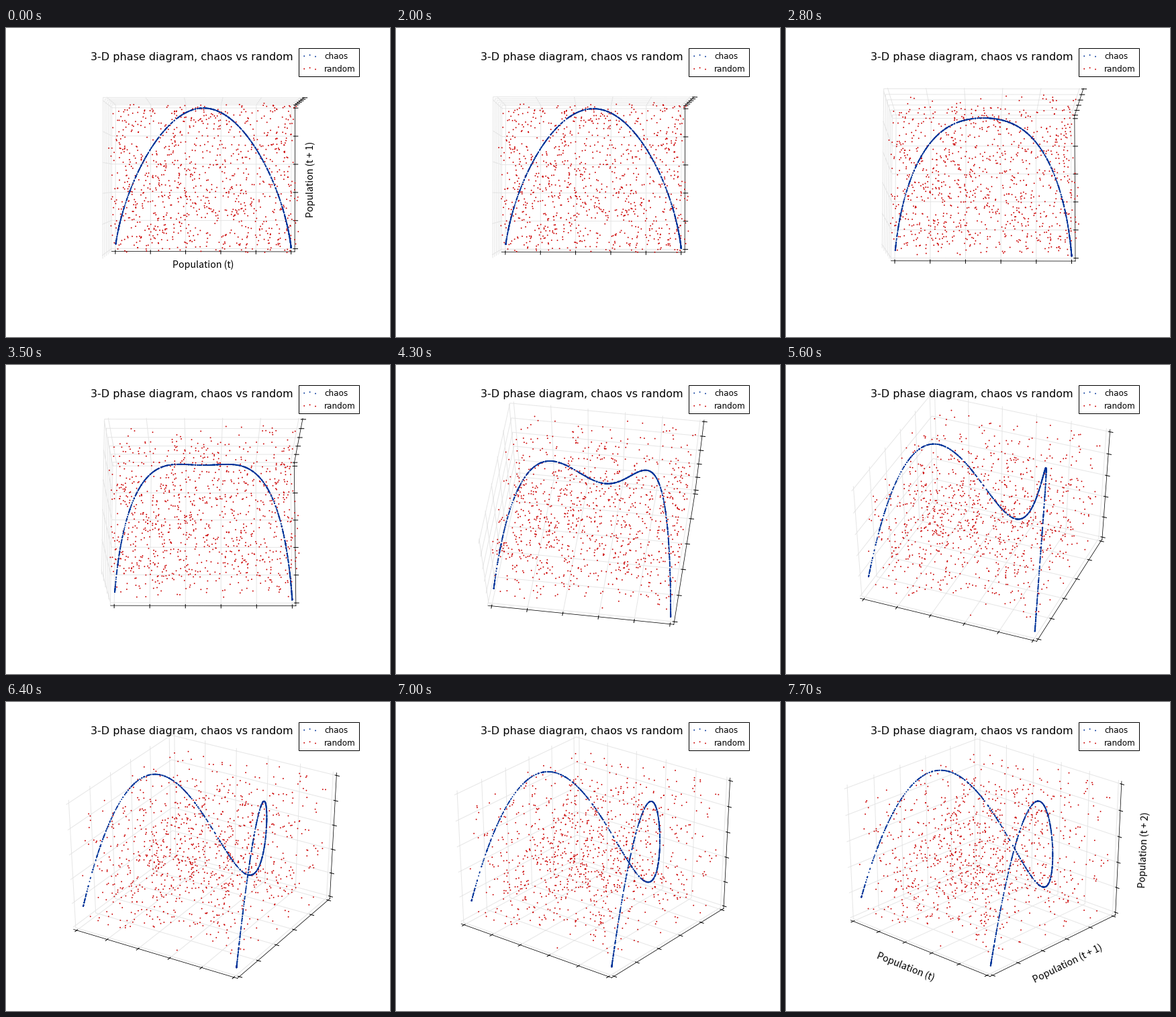
Animation of 572x460 px, one loop 10000 ms. Source, as a matplotlib script:

```python
import numpy as np
import matplotlib.pyplot as plt
from matplotlib.animation import FuncAnimation
from matplotlib.patches import Rectangle

W, H, DPI = 572, 460, 72          # at 72 dpi one point is one pixel
CENTER = np.array([294.0, 223.5])
SCALE = np.array([3016.0, -2413.0])
DIST = 11.0
BLUE, RED, GRID = "#003399", "#cc0000", "#e6e6e6"
DOT = 1.9
TICKS = np.linspace(0, 1, 6)
LO, HI = -1 / 48, 1 + 1 / 48      # panes sit slightly outside the data cube
OUT, IN = 0.2 / 12, 0.1 / 12      # tick lengths on each side of an axis

# first frame, last frame, elevation step, azimuth step
CAMERA = [(20, 22, -0.5, 0), (23, 36, -1.0, 0), (37, 60, -1.5, 1.1),
          (61, 64, -1.0, 1.1), (65, 73, -0.5, 1.1), (74, 76, -0.2, 0.5)]


def view(n):
    elev, azim = 89.9, 270.1
    for first, last, de, da in CAMERA:
        steps = min(max(n - first + 1, 0), last - first + 1)
        elev += steps * de
        azim += steps * da
    return np.radians(elev), np.radians(azim)


def project(points, n):
    e, a = view(n)
    right = [-np.sin(a), np.cos(a), 0]
    up = [-np.cos(a) * np.sin(e), -np.sin(a) * np.sin(e), np.cos(e)]
    toward = [np.cos(a) * np.cos(e), np.sin(a) * np.cos(e), np.sin(e)]
    x, y, z = np.array([right, up, toward]) @ (points - 0.5).T
    return CENTER + SCALE * np.column_stack([x, y]) / (DIST - z)[:, None]


def join(paths):
    """Stack polylines into one array, separated by NaN rows."""
    gap = [[np.nan] * 3]
    return np.array([p for path in paths for p in list(path) + gap], float)


def logistic(count, rate=3.99, pop=0.5):
    pops = [pop]
    while len(pops) < count:
        pops.append(rate * pops[-1] * (1 - pops[-1]))
    return np.array(pops)


def embed(series):
    return np.column_stack([series[:-2], series[1:-1], series[2:]])


chaos = embed(logistic(1000))
noise = embed(np.random.RandomState(0).random_sample(1000))

grid = join([[(t, LO, LO), (t, HI, LO), (t, HI, HI)] for t in TICKS]
            + [[(HI, t, LO), (LO, t, LO), (LO, t, HI)] for t in TICKS]
            + [[(LO, LO, t), (LO, HI, t), (HI, HI, t)] for t in TICKS])
axes = join([[(LO, LO, LO), (HI, LO, LO)],
             [(HI, LO, LO), (HI, HI, LO)],
             [(HI, HI, LO), (HI, HI, HI)]])
ticks = join([[(t, LO - OUT, LO), (t, LO + IN, LO)] for t in TICKS]
             + [[(HI + OUT, t, LO), (HI - IN, t, LO)] for t in TICKS]
             + [[(HI + OUT, HI, t), (HI - IN, HI, t)] for t in TICKS])

fig = plt.figure(figsize=(W / DPI, H / DPI), dpi=DPI, facecolor="white")
ax = fig.add_axes([0, 0, 1, 1])
ax.set_xlim(0, W)
ax.set_ylim(H, 0)
ax.axis("off")


def line(color, width):
    return ax.plot([], [], color=color, lw=width)[0]


def dots(color, xy, z=3):
    # one colour per dot keeps the dots off the pixel grid, so they glide
    xs, ys = np.transpose(xy)
    return ax.scatter(xs, ys, s=DOT ** 2, c=[color] * len(xs),
                      linewidths=0, zorder=z)


lines = [(line(GRID, 1), grid), (line("black", 0.75), axes),
         (line("black", 1), ticks)]
clouds = [(dots(RED, project(noise, 0)), noise),
          (dots(BLUE, project(chaos, 0)), chaos)]
ax.set_xlim(0, W)
ax.set_ylim(H, 0)

ax.text(276.6, 48, "3-D phase diagram, chaos vs random", fontsize=16,
        family="DejaVu Sans", ha="center", va="baseline", zorder=5)

ax.add_patch(Rectangle((436, 30), 90, 42, fc="white", ec="black",
                       lw=1, zorder=6))
for name, color, base in [("chaos", BLUE, 46), ("random", RED, 65)]:
    ax.text(474, base, name, fontsize=12, family="DejaVu Sans", zorder=7)
    dots(color, [(444.2, base - 4.2), (452.6, base - 5.7),
                 (461, base - 3.5)], z=7)


def label(x, y, text, angle):
    return ax.text(x, y, text, rotation=angle, fontsize=14.2,
                   family="Noto Sans CJK JP", ha="center", va="center")


start_labels = [label(293.5, 353, "Population (t)", 0),
                label(454, 225.5, "Population (t + 1)", 90)]
end_labels = [label(178.5, 394.5, "Population (t)", -22),
              label(420, 389.5, "Population (t + 1)", 26.1),
              label(533, 220.5, "Population (t + 2)", 87.4)]


def draw(n):
    for artist, points in lines:
        artist.set_data(*project(points, n).T)
    for artist, points in clouds:
        artist.set_offsets(project(points, n))
    for text in start_labels:
        text.set_visible(n < 20)
    for text in end_labels:
        text.set_visible(n >= 77)
    return [artist for artist, _ in lines + clouds] + start_labels + end_labels


anim = FuncAnimation(fig, draw, frames=100, interval=100, repeat=True)
plt.show()
```
